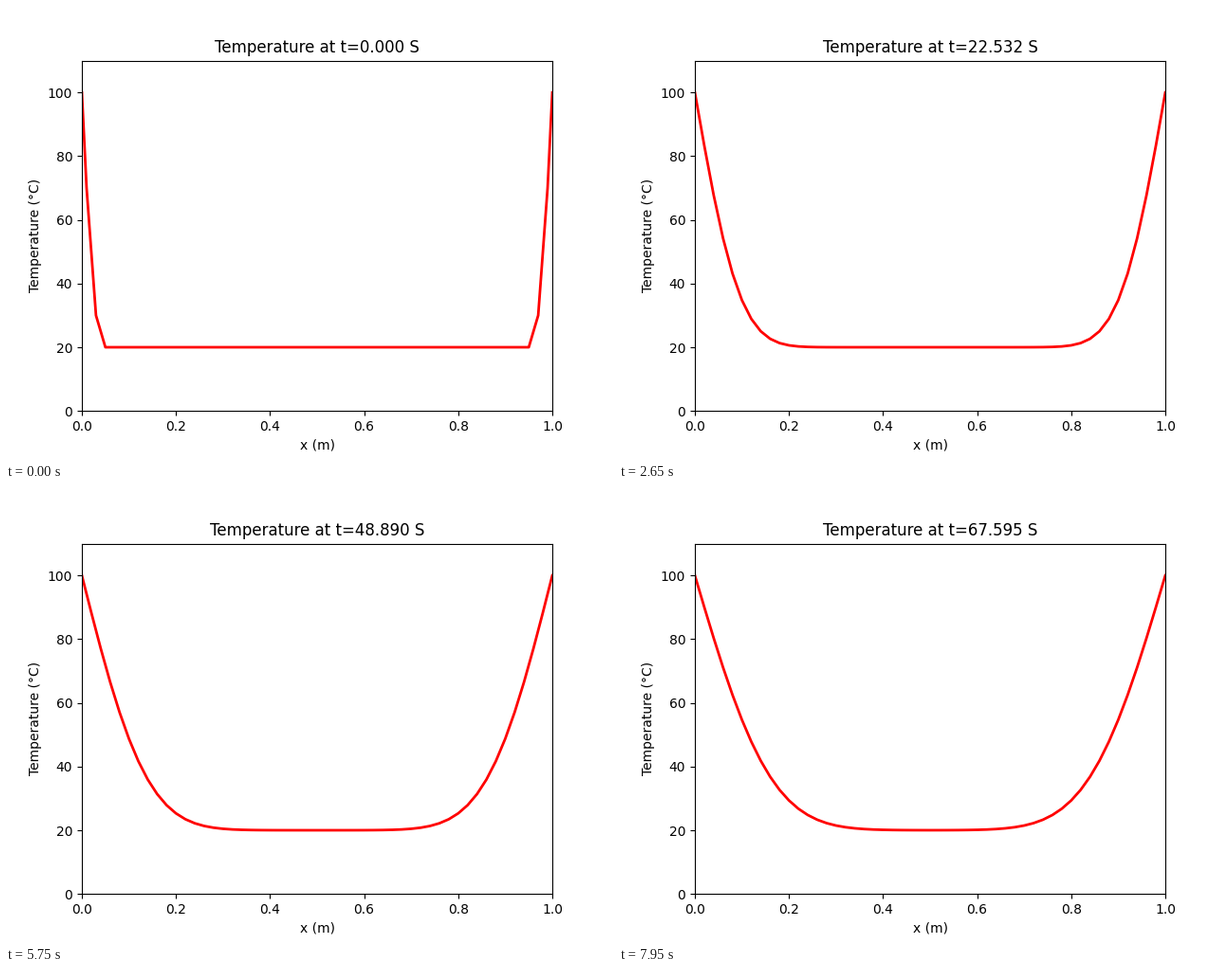
Animation of 640 by 480 pixels, one loop 8000 ms. Source, as a matplotlib script:

```python
import numpy as np
import matplotlib.pyplot as plt
from matplotlib.animation import FuncAnimation

FRAMES = 160
INTERVAL = 50          # ms
DT = 0.425127          # seconds per solver step
WARMUP = 4             # solver steps done before t = 0
CELLS = 100
T_EDGE, T_START = 100.0, 20.0


def solve(steps):
    """Explicit heat equation at the stability limit (r = 1/2)."""
    temp = np.full(CELLS + 1, T_START)
    temp[[0, -1]] = T_EDGE
    history = [temp]
    for _ in range(steps):
        temp = temp.copy()
        temp[1:-1] = (temp[:-2] + temp[2:]) / 2
        history.append(temp)
    return history


history = solve(WARMUP + FRAMES)
x = np.linspace(0, 1, CELLS + 1)

plt.rcParams["font.family"] = "DejaVu Sans"
fig, ax = plt.subplots(figsize=(6.4, 4.8), dpi=100)
line, = ax.plot(x, history[WARMUP], color="red", lw=2)
ax.set_xlim(0, 1)
ax.set_ylim(0, 110)
ax.set_xlabel("x (m)")
ax.set_ylabel("Temperature (°C)")
title = ax.set_title("")


def update(i):
    line.set_ydata(history[WARMUP + i])
    title.set_text(f"Temperature at t={i * DT:.3f} S")
    return line, title


anim = FuncAnimation(fig, update, frames=FRAMES, interval=INTERVAL,
                     repeat=True, repeat_delay=0, blit=False)
plt.show()
```
